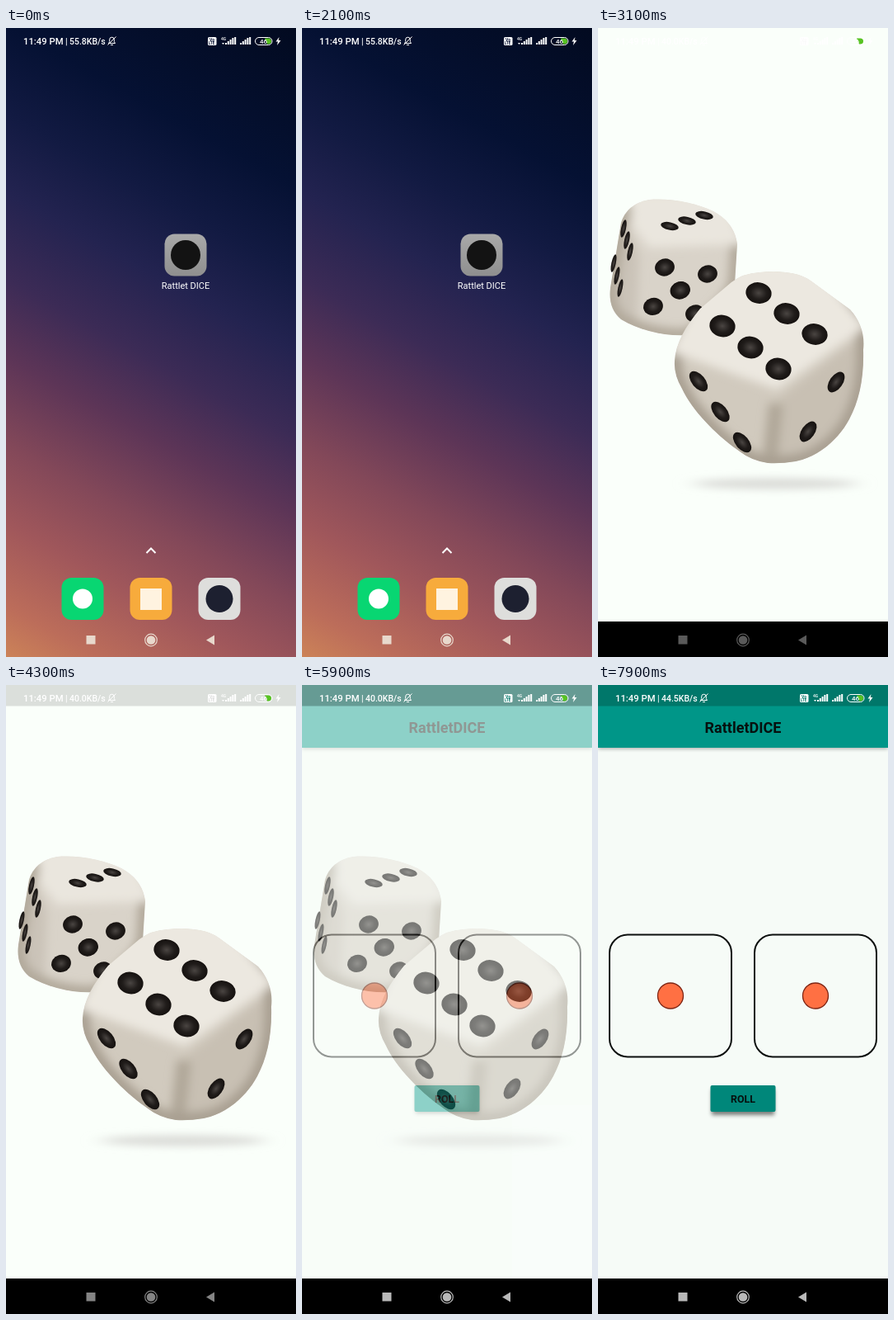
Write an HTML page that moves like this. It is 352 by 762 pixels and loops after 8000 ms.

```html
<!DOCTYPE html>
<html lang="en">
<head>
<meta charset="utf-8">
<title>Dice app</title>
<style>
  html, body { margin: 0; width: 100%; height: 100%; overflow: hidden; background: #000; }
  #stage { display: block; width: 352px; height: 762px; font-family: Roboto, sans-serif; }
  .mid { text-anchor: middle; }
</style>
</head>
<body>
<svg id="stage" viewBox="0 0 352 762">
  <defs>
    <linearGradient id="sky" gradientUnits="userSpaceOnUse" x1="352" y1="0" x2="-52" y2="734">
      <stop offset="0" stop-color="#020a20"/>
      <stop offset=".2" stop-color="#051133"/>
      <stop offset=".31" stop-color="#121a42"/>
      <stop offset=".41" stop-color="#232350"/>
      <stop offset=".52" stop-color="#3c2b56"/>
      <stop offset=".62" stop-color="#5d3557"/>
      <stop offset=".73" stop-color="#834859"/>
      <stop offset=".83" stop-color="#a0575b"/>
      <stop offset=".935" stop-color="#bc6d5a"/>
      <stop offset="1" stop-color="#cc8358"/>
    </linearGradient>
    <linearGradient id="tile" x2="0" y2="1">
      <stop stop-color="#a9a9a9"/><stop offset="1" stop-color="#8f8f8f"/>
    </linearGradient>
    <radialGradient id="pip">
      <stop stop-color="#4a4542"/><stop offset=".6" stop-color="#211d1b"/><stop offset="1" stop-color="#15110f"/>
    </radialGradient>
    <filter id="soft" x="-20%" y="-20%" width="140%" height="140%"><feGaussianBlur stdDeviation="6"/></filter>
    <filter id="haze" x="-20%" y="-200%" width="140%" height="500%"><feGaussianBlur stdDeviation="12 5"/></filter>
    <filter id="drop" x="-20%" y="-60%" width="140%" height="220%"><feGaussianBlur stdDeviation="2.5"/></filter>
    <path id="bigShape" d="M93 404C94 382 106 362 124 340L162 308Q176 297 196 296C222 293 246 297 258 306L306 341Q325 362 322 390C323 424 317 452 305 474C291 500 266 520 240 525Q222 528 206 527Q186 524 172 513C146 495 115 465 102 437Q92 420 93 404Z"/>
    <path id="smallShape" d="M28 236Q35 213 62 208C90 206 118 212 140 222Q166 236 169 262L166 310Q160 330 110 372C80 374 50 366 28 353Q12 340 15 315Z"/>
    <clipPath id="bigClip"><use href="#bigShape"/></clipPath>
    <clipPath id="smallClip"><use href="#smallShape"/></clipPath>
    <path id="bars" fill="#fff" d="M0 20v-2h2v2zM2.800 20v-4h2v4zM5.600 20v-6h2v6zM8.400 20v-8h2v8zM11.200 20v-9h2v9z"/>
  </defs>

  <rect width="352" height="762" fill="url(#sky)"/>

  <g id="home">
    <rect x="192.500" y="249.500" width="51" height="51" rx="12" fill="url(#tile)"/>
    <circle cx="218" cy="275" r="18" fill="#131313"/>
    <text class="mid" x="218" y="316" font-size="11" fill="#fff">Rattlet DICE</text>
    <path d="M170.500 636l5.500-5.500 5.500 5.500" fill="none" stroke="#fff" stroke-width="2"/>
    <rect x="67.500" y="666" width="51" height="51" rx="12" fill="#08d672"/>
    <circle cx="93" cy="691.500" r="12" fill="#fff"/>
    <rect x="150.500" y="666" width="51" height="51" rx="12" fill="#f7ab3c"/>
    <rect x="163" y="679" width="26" height="26" fill="#fff3e0"/>
    <rect x="233.500" y="666" width="51" height="51" rx="12" fill="#dededc"/>
    <circle cx="259" cy="691.500" r="16.500" fill="#1d2030"/>
  </g>

  <svg id="splash" viewBox="0 0 352 719" preserveAspectRatio="xMidYMid slice">
    <rect y="-400" width="352" height="1600" fill="#fafffa"/>
    <ellipse cx="215" cy="552" rx="100" ry="7" fill="#dcddd9" filter="url(#haze)"/>
    <g clip-path="url(#smallClip)">
      <use href="#smallShape" fill="#d9d3c9"/>
      <g filter="url(#soft)">
        <path d="M5 225L30 232 50 275 46 372 0 360Z" fill="#cac3b8"/>
        <use href="#smallShape" fill="none" stroke="#b0a799" stroke-width="16"/>
        <path d="M38 200L150 200 178 262 62 266 42 240Z" fill="#eae6de"/>
      </g>
    </g>
    <g id="smallPips" fill="url(#pip)"></g>
    <g clip-path="url(#bigClip)">
      <use href="#bigShape" fill="#d1cabe"/>
      <g filter="url(#soft)">
        <path d="M217 452L318 375 340 400 300 520 215 535Z" fill="#c8c0b3"/>
        <path d="M216 455L208 530" fill="none" stroke="#b0a799" stroke-width="18"/>
        <use href="#bigShape" fill="none" stroke="#a89f91" stroke-width="18"/>
        <path d="M88 392L120 325 185 280 265 290 325 362 217 438Z" fill="#ece8e0"/>
      </g>
    </g>
    <g id="bigPips" fill="url(#pip)"></g>
  </svg>

  <rect id="shade" width="352" height="25.500"/>

  <g id="app">
    <rect width="352" height="719" fill="#f6fbf7"/>
    <rect y="30" width="352" height="47" opacity=".35" filter="url(#drop)"/>
    <rect y="25" width="352" height="51" fill="#009688"/>
    <rect width="352" height="25.500" fill="#00776a"/>
    <text class="mid" x="176" y="57.500" font-size="18" font-weight="700" fill="#06110f">RattletDICE</text>
    <g id="faces" fill="none" stroke="#0c0f0e" stroke-width="2"></g>
    <rect id="lift" x="138" width="76" height="31" filter="url(#drop)"/>
    <rect x="136.500" y="485" width="79" height="32" rx="2" fill="#009688"/>
    <rect id="press" x="136.500" y="485" width="79" height="32" rx="2"/>
    <text class="mid" x="176" y="505.500" font-size="12.400" font-weight="700" fill="#06110f">ROLL</text>
  </g>

  <g id="status" fill="#fff" font-weight="500">
    <text x="21" y="20" font-size="11.300">11:49 PM</text>
    <text x="72" y="19.500" font-size="10.500">|</text>
    <text id="speed" x="77" y="20" font-size="10.500"></text>
    <path d="M124.500 18.500h8l-1.200-2v-2.500a2.800 2.800 0 0 0-5.600 0v2.500zM127 20.500h3M123.500 20.500l10-10" fill="none" stroke="#fff"/>
    <rect x="245" y="11" width="10.500" height="10" rx="1.500"/>
    <g fill="var(--bar)" font-size="5" font-weight="700">
      <text x="247" y="15.700">Vo</text><text x="246" y="20.200" font-size="4.500">LTE</text>
    </g>
    <text x="261" y="15" font-size="5">4G</text>
    <path d="M262 18h3l-1.500 2z"/>
    <use href="#bars" x="266"/>
    <use href="#bars" x="284"/>
    <path d="M314 12.500h4.500a3.500 3.500 0 0 1 0 7h-1.500z" fill="#57c322"/>
    <rect x="302.500" y="11.500" width="20.500" height="9" rx="4.500" fill="none" stroke="#fff"/>
    <text x="308" y="19" font-size="8">46</text>
    <path d="M331.500 11l-4 5.500h2.500l-1 4.500 4.500-6h-2.800z"/>
  </g>

  <rect id="navBack" y="719" width="352" height="43"/>
  <g id="nav">
    <path d="M97.500 736h11v10.500h-11zM243 741.500l10-6v12z"/>
    <circle cx="176" cy="741.500" r="5.300"/>
    <circle cx="176" cy="741.500" r="7.300" fill="none" stroke="currentColor" stroke-width="1.200"/>
  </g>
</svg>

<script>
const $ = id => document.getElementById(id);
const set = (id, attrs) => { for (const k in attrs) $(id).setAttribute(k, attrs[k]); };
const ramp = (t, from, to) => Math.min(1, Math.max(0, (t - from) / (to - from)));
const mix = (a, b, p) => a + (b - a) * p;
const easeOut = u => 1 - (1 - u) ** 3;
const easeInOut = u => u < .5 ? 4 * u ** 3 : 1 - 4 * (1 - u) ** 3;
const grey = v => `rgb(${v},${v},${v})`;

// A straight row of n pips
function row(id, n, x, y, dx, dy, rx, ry, turn = 0) {
  for (let i = 0; i < n; i++)
    $(id).innerHTML += `<ellipse rx="${rx}" ry="${ry}" transform="translate(${x + i * dx} ${y + i * dy}) rotate(${turn})"/>`;
}
row('bigPips', 3, 195, 321, 34, 25, 15.7, 12.8, 10);
row('bigPips', 3, 151, 361, 34, 26, 15.7, 13.3, 10);
row('bigPips', 3, 122, 428, 26.5, 37, 14.5, 8, 50);
row('bigPips', 2, 289, 429, -34, 60, 14, 8, -55);
row('smallPips', 3, 87, 240, 21, -6.5, 11, 4.7, 12);
row('smallPips', 3, 81, 290, 18.5, 28, 12, 10.5, -15);
row('smallPips', 3, 133, 298, -33, 19.7, 12, 10.5, -15);
row('smallPips', 3, 31, 243, 4, 14, 3, 11, 12);
row('smallPips', 3, 19, 285, 4, 15, 2.7, 11, 12);

for (const x of [14, 190])
  $('faces').innerHTML += `<rect x="${x}" y="302.500" width="148" height="148" rx="22"/>
    <circle cx="${x + 74}" cy="376.500" r="15.500" fill="#ff7043" stroke="#7d2413" stroke-width="1.300"/>`;

function render(t) {
  // The window grows out of the launcher icon
  const open = easeOut(ramp(t, 2110, 2383));
  const x = mix(192, 0, open), y = mix(249, 0, open);
  set('home', { opacity: Math.max(0, 1 - open * 1.5) });
  set('splash', {
    x, y, width: mix(243, 352, open) - x, height: mix(300, 719, open) - y,
    opacity: Math.min(1, open * 3)
  });

  const dim = ramp(t, 2110, 2360);
  const bright = ramp(t, 4220, 4400);
  const navColor = t < 2200 ? '#e8d8cc' : grey(mix(90, 185, bright));
  set('shade', { opacity: .28 * bright });
  set('navBack', { opacity: dim });
  set('nav', { fill: navColor, color: navColor });

  set('app', { opacity: easeInOut(ramp(t, 5600, 6230)) });
  const press = ramp(t, 7500, 7700);
  set('press', { opacity: .1 * press });
  set('lift', { y: mix(487.5, 490, press), opacity: mix(.4, .5, press) });

  $('speed').textContent = (t < 2400 ? '55.8' : t < 6500 ? '40.0' : '44.5') + 'KB/s';
  const bar = t < 2200 ? '#081233' : t < 5900 ? grey(mix(250, 180, bright)) : '#00776a';
  $('status').style.setProperty('--bar', bar);
}

const start = performance.now();
function tick() {
  const t = (performance.now() - start) % 8000;
  render(Math.floor(t / 100) * 100);
  requestAnimationFrame(tick);
}
tick();
</script>
</body>
</html>
```
